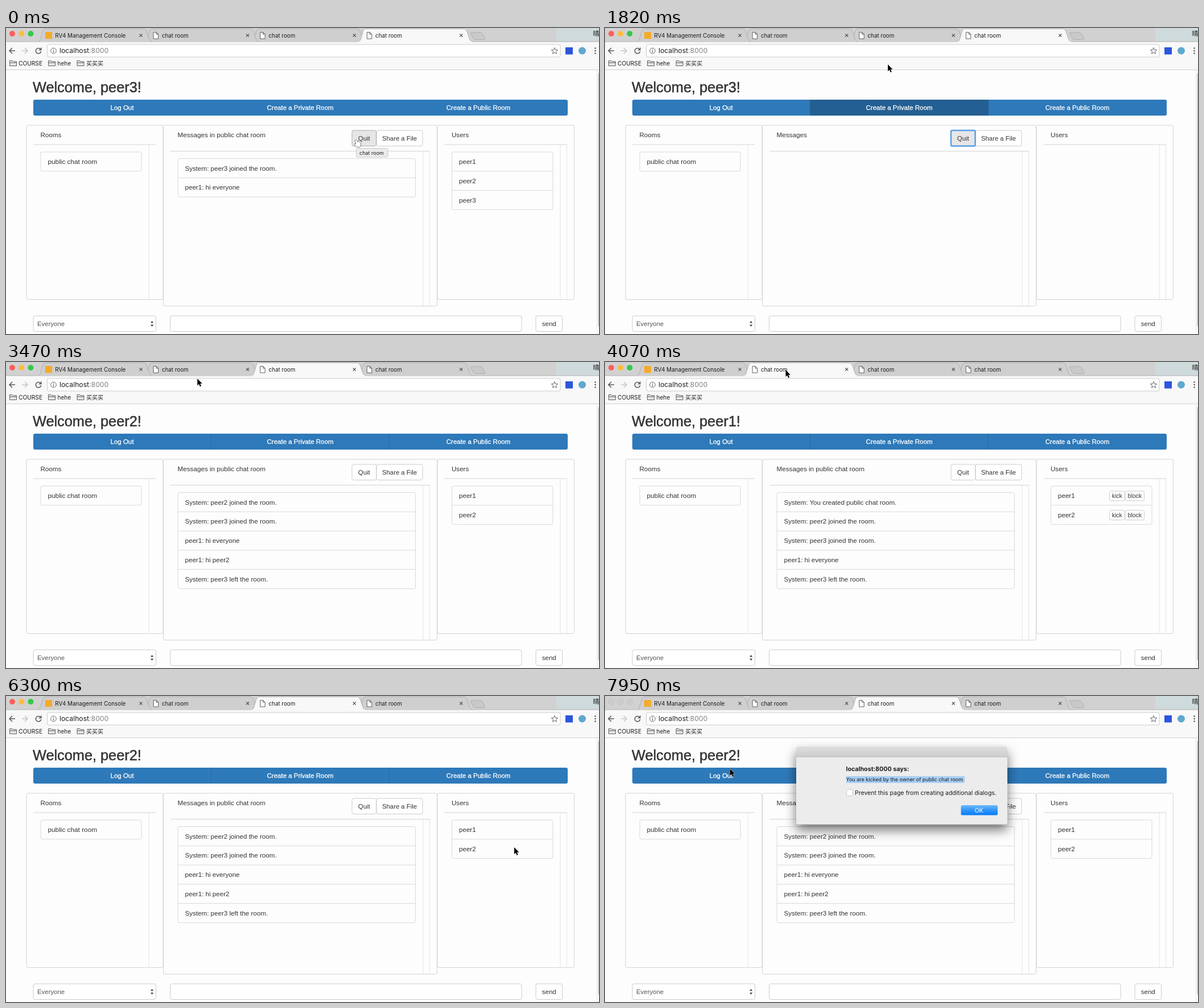
An HTML page that plays this animation: 1042x538 px, repeating every 8 s.

```html
<!DOCTYPE html>
<html lang="en">
<head>
<meta charset="utf-8">
<title>Chat room</title>
<style>
html, body { margin: 0; width: 100%; height: 100%; overflow: hidden; background: #fdfdfd; }
svg { display: block; width: 1042px; height: 538px; }
text { font-family: "Liberation Sans", Arial, sans-serif; fill: #333; white-space: pre; }
.ui { font-family: Inter, "Noto Sans CJK SC", "Noto Sans CJK", sans-serif; fill: #1c1c1c; }
.mid { text-anchor: middle; }
.nav { fill: #fff; stroke: #fff; stroke-width: .3; }
</style>
</head>
<body>
<svg viewBox="0 0 1042 538">
  <defs>
    <linearGradient id="title" x2="0" y2="1"><stop stop-color="#dedede"/><stop offset="1" stop-color="#cdcdcd"/></linearGradient>
    <linearGradient id="ok" x2="0" y2="1"><stop stop-color="#6cb9fb"/><stop offset=".5" stop-color="#2f96fa"/><stop offset="1" stop-color="#067bf8"/></linearGradient>
    <filter id="shadow" x="-20%" y="-40%" width="140%" height="200%"><feDropShadow dx="0" dy="10" stdDeviation="10" flood-opacity=".55"/></filter>
  </defs>
  <g id="back"></g>
  <g id="live"></g>
</svg>
<script>
const LOOP = 8000, STEP = 150;
const $ = id => document.getElementById(id);

const text = (x, y, s, size = 11.6, cls = '', extra = '') =>
  `<text x="${x}" y="${y}" font-size="${size}" class="${cls}" ${extra}>${s}</text>`;
const ui = (x, y, s, size = 10, extra = '') => text(x, y, s, size, 'ui', extra);
const box = (x, y, x2, y2, fill = '#fdfdfd', stroke = '#d2d2d2', r = 3) =>
  `<rect x="${x}" y="${y}" width="${x2 - x}" height="${y2 - y}" rx="${r}" fill="${fill}" stroke="${stroke}"/>`;
const path = (d, stroke = '#5a5a5a', width = 1, fill = 'none', extra = '') =>
  `<path d="${d}" fill="${fill}" stroke="${stroke}" stroke-width="${width}" ${extra}/>`;
const dot = (x, y, r, fill, stroke = 'none') =>
  `<circle cx="${x}" cy="${y}" r="${r}" fill="${fill}" stroke="${stroke}"/>`;

function button(x, y, x2, y2, label, size, style = '') {
  const fill = style ? '#e6e6e6' : '#fff';
  const stroke = style ? '#adadad' : '#ccc';
  const ring = style === 'focus'
    ? `<rect x="${x}" y="${y}" width="${x2 - x}" height="${y2 - y}" rx="2" fill="none" stroke="#5a9ee6" stroke-width="2.4"/>` : '';
  return box(x, y, x2, y2, fill, stroke) + ring +
    text((x + x2) / 2, (y + y2) / 2 + size * .37, label, size, 'mid');
}

function list(x, x2, y, items, size) {
  const row = 33.8;
  if (!items.length) return '';
  return box(x, y, x2, y + row * items.length, '#fdfdfd', '#d9d9d9') +
    items.map((s, i) => (i ? path(`M${x} ${y + row * i}H${x2}`, '#d9d9d9') : '') +
      text(x + 12.5, y + row * i + 21, s, size)).join('');
}

function folder(x) {
  return path(`M${x + .5} 66.500V57.500h4.500l1.500 1.500h6v7.500zM${x + .5} 61h12`, '#606060', 1, '#e4e4e4');
}

// Everything that never changes
function backdrop() {
  let s = '<rect width="1042" height="24" fill="#d2d1d2"/><rect x="967" width="75" height="23" fill="#cfdadc"/>' +
    '<rect y="24" width="1042" height="50" fill="#f8f8f8"/>' + path('M0 73.500H1042', '#d0d0d0') +
    path('M0 24H1042', '#b2b2b2') + ui(1031.5, 14, '晴', 11) +
    path('M817 8h17q2 0 3 2l4.500 8q1 2.500-1 2.500h-16q-2 0-3-2l-4.500-8q-1-2.500 0-2.500z', '#aeaeae', 1, '#c9c9c9');
  s += path('M16 40H6M11 35l-5 5 5 5', '#555', 1.5) + path('M28 40H38M33 35l5 5-5 5', '#c6c6c6', 1.5) +
    path('M61 37.500A4.700 4.700 0 1 0 61.700 41M61.800 34.500V38.500H57.800', '#555', 1.5);
  s += box(72.5, 29, 974, 51, '#fff', '#cbcbcb') + dot(83.5, 40, 4.8, 'none', '#666') +
    path('M83.500 39.300V43M83.500 37V38.200', '#666', 1.2) +
    ui(94, 44, 'localhost<tspan fill="#808080">:8000</tspan>', 12.2);
  s += path('M964 34.500l1.600 3.800 4 .3-3.100 2.700 1 4-3.500-2.200-3.500 2.200 1-4-3.100-2.700 4-.3z', '#666') +
    '<rect x="983" y="34" width="13" height="12.500" fill="#2c55dc"/>' + dot(1012.5, 40, 6.5, '#5fa8cf');
  for (const y of [35.5, 40, 44.5]) s += dot(1035.5, y, 1.3, '#555');
  s += folder(6) + ui(22, 66, 'COURSE', 10.2) + folder(74) + ui(90.5, 66, 'hehe') + folder(124.5) + ui(141, 66, '买买买');

  s += path('M1038.500 74V538', '#e7e7e7') + '<rect x="1040.500" y="79" width="5" height="446" rx="2" fill="#bdbdbd"/>';
  s += '<rect x="48" y="126" width="939" height="28" rx="3" fill="#2e79b9"/>';
  const panels = [[36, 276, 477.5, 48, 263, 205], [276.5, 757.5, 489, 289, 745, 216.5], [758, 998.5, 477.5, 770.5, 986, 205]];
  panels.forEach(([x, x2, bottom, a, b, y], i) => {
    s += box(x, 171, x2, bottom, '#fdfdfd', '#d3d3d3') + path(`M${b - 12} ${y}V${bottom}` + (i ? `M${b - .5} ${y}V${bottom}` : ''), '#e5e5e5') +
      path(`M${a} ${y}H${b}`, '#d3d3d3');
  });
  s += text(60.5, 192, 'Rooms') + text(783, 192, 'Users') + list(61, 238, 218, ['public chat room'], 11.8);
  s += box(48, 506, 263.5, 533.5, '#fff', '#ccc') + text(55, 524, 'Everyone', 11.4, '', 'style="fill:#555"') +
    path('M254 518.500l2.600-3.500 2.600 3.500zM254 521.500l2.600 3.500 2.600-3.500z', 'none', 0, '#444');
  s += box(288.5, 506, 906, 533.5, '#fff', '#ccc') + button(931, 506, 977.5, 533.5, 'send', 11.6);
  return s;
}

function tab(i, active) {
  const x = 57 + 187.6 * i;
  const d = `M${x} 24C${x + 5} 24 ${x + 6} 2 ${x + 11} 1.500H${x + 186}C${x + 192} 2 ${x + 193} 24 ${x + 199} 24`;
  let s = path(d, '#b0b0b0', 1, active ? '#f8f8f8' : '#cfcfcf');
  if (active) s += `<rect x="${x}" y="23.400" width="199" height="1.600" fill="#f8f8f8"/>`;
  s += i ? path(`M${x + 14.5} 7.500h5l3.500 3.500v8h-8.500zM${x + 19.5} 7.500v3.500h3.500`, '#606060', 1, '#fff')
    : '<rect x="69" y="7" width="12" height="12" fill="#f4ab2a"/>';
  return s + ui(x + 29.3, 16.7, i ? 'chat room' : 'RV4 Management Console', i ? 9.8 : 9.9) +
    path(`M${x + 177.5} 10.500l5 5m0-5l-5 5`, '#555', 1.1);
}

function lights(on) {
  return ['#fc5f5a', '#fdbc40', '#35c84b'].map((c, i) => {
    const x = 11 + 16.2 * i;
    return on ? dot(x, 10, 5, c) : dot(x, 10, 4.7, '#d2d2d2', '#b9b9b9') + dot(x, 10, 1.8, '#c0c0c0');
  }).join('');
}

const says = (who, what) => `System: ${who} ${what} the room.`;
const greet = 'peer1: hi everyone';
const joined = n => says('peer' + n, 'joined');
const left3 = says('peer3', 'left');
const views = {
  guest: { who: 3, log: [joined(3), greet], users: 3 },
  gone: { who: 3, log: [], users: 0 },
  second: { who: 2, log: [joined(2), joined(3), greet, 'peer1: hi peer2', left3], users: 2 },
  owner: { who: 1, log: ['System: You created public chat room.', joined(2), joined(3), greet, left3], users: 2 }
};
const viewAt = t => views[t < 1380 ? 'guest' : t < 2420 ? 'gone' : t < 4070 ? 'second' : t < 6160 ? 'owner' : 'second'];

// start, steps, control point, end point
const moves = [
  [1670, 2, [568, 140], [497, 64]],
  [1970, 3, [500, 34], [519, 12]],
  [3170, 4, [370, 72], [317.5, 14]],
  [4370, 7, [600, 110], [857.5, 310]],
  [5420, 2, [878, 285], [893, 266]],
  [6600, 5, [800, 170], [650, 144]],
  [7350, 5, [430, 144], [219.5, 128]]
];

function cursorAt(t) {
  let p = [615, 196];
  for (const [start, steps, c, end] of moves) {
    if (t < start) break;
    const u = Math.min(steps, Math.floor((t - start) / STEP) + 1) / steps;
    const k = u * u * (3 - 2 * u);
    p = p.map((v, i) => (1 - k) ** 2 * v + 2 * k * (1 - k) * c[i] + k * k * end[i]);
  }
  return p;
}

function cursor([x, y], hand) {
  const d = hand
    ? 'M-1.500 1Q0 -1 1.300 1L2.300 5Q4-.2 4.600 4.800Q6 3.500 6.700 5.300Q8.300 4.500 8.300 7V9.500L7 13H1L-3 8.500Q-3 6.800 0 8z'
    : 'M0 0V12L2.800 9.500 4.700 14 6.700 13.100 4.800 8.800H8.500Z';
  return `<g transform="translate(${x} ${y})">` +
    path(d, hand ? '#111' : '#fff', hand ? 1 : .9, hand ? '#fff' : '#000', 'paint-order="stroke" stroke-linejoin="round"') + '</g>';
}

function dialog(selected) {
  let s = '<rect x="336" y="89" width="371" height="136.500" rx="4" fill="#ececec" filter="url(#shadow)"/>' +
    '<path d="M336 107V93q0-4 4-4H703q4 0 4 4V107z" fill="url(#title)"/>' + path('M336 107H707', '#b9b9b9');
  if (selected < 632) s += `<rect x="${selected}" y="141" width="${632 - selected}" height="12" fill="#a9cef4"/>`;
  return s + ui(423.5, 132, 'localhost:8000 says:', 10.7, 'font-weight="700"') +
    ui(423.5, 150, 'You are kicked by the owner of public chat room', 9) +
    box(424.5, 164.5, 435.5, 175.5, '#fff', '#c6c6c6', 2) +
    ui(439, 174, 'Prevent this page from creating additional dialogs.', 10.5) +
    '<rect x="625.500" y="192" width="64.500" height="17.500" rx="2.500" fill="url(#ok)"/>' +
    ui(657, 204.5, 'OK', 10.5, 'text-anchor="middle" style="fill:#fff"');
}

function scene(t) {
  const { who, log, users } = viewAt(t);
  const [x, y] = cursorAt(t);
  const alert = t >= 6310;
  let s = lights(!alert);
  for (const i of [3, 2, 1, 0]) if (i !== who) s += tab(i, false);
  s += tab(who, true);

  s += text(47, 113, `Welcome, peer${who}!`, 25.3, '', 'stroke="#333" stroke-width=".500"');
  if (t >= 1670) s += path('M360.500 126V154M673.500 126V154', '#2a6a9f');
  if (t >= 1670 && t < 1970) s += '<rect x="360" y="126" width="314" height="28" fill="#235f92"/>';
  s += text(204, 144, 'Log Out', 11.5, 'mid nav') + text(517, 144, 'Create a Private Room', 11.5, 'mid nav') +
    text(830, 144, 'Create a Public Room', 11.5, 'mid nav');

  s += text(301.5, 192, log.length ? 'Messages in public chat room' : 'Messages', 11.7);
  s += button(651, 180, 732, 207.5, 'Share a File', 11.3) +
    button(608, 180, 650.5, 207.5, 'Quit', 11.4, t < 1230 ? 'hover' : t < 2420 ? 'focus' : '');
  s += list(302, 719.5, 229.5, log, 11.6);
  s += list(783.5, 961, 218, [1, 2, 3].slice(0, users).map(n => 'peer' + n), 11.6);
  if (who === 1) {
    for (const i of [0, 1]) {
      const top = 227 + 33.8 * i;
      s += button(886.5, top, 913, top + 17, 'kick', 10.4, i && t >= 5570 ? 'hover' : '') +
        button(914, top, 947.5, top + 17, 'block', 10.4);
    }
  }
  if (t < 1230) s += box(615.5, 211.5, 671, 227, '#ebebeb', '#cacaca', 2) + ui(621, 222.5, 'chat room', 9);
  if (alert) s += dialog(t < 7350 ? 632 : Math.max(424, x));
  return s + cursor([x, y], t < 1820 || (t >= 5570 && t < 6160));
}

$('back').innerHTML = backdrop();
const begin = performance.now();
let shown = '';
function draw() {
  const next = scene((performance.now() - begin) % LOOP);
  if (next !== shown) $('live').innerHTML = shown = next;
  requestAnimationFrame(draw);
}
draw();
</script>
</body>
</html>
```
